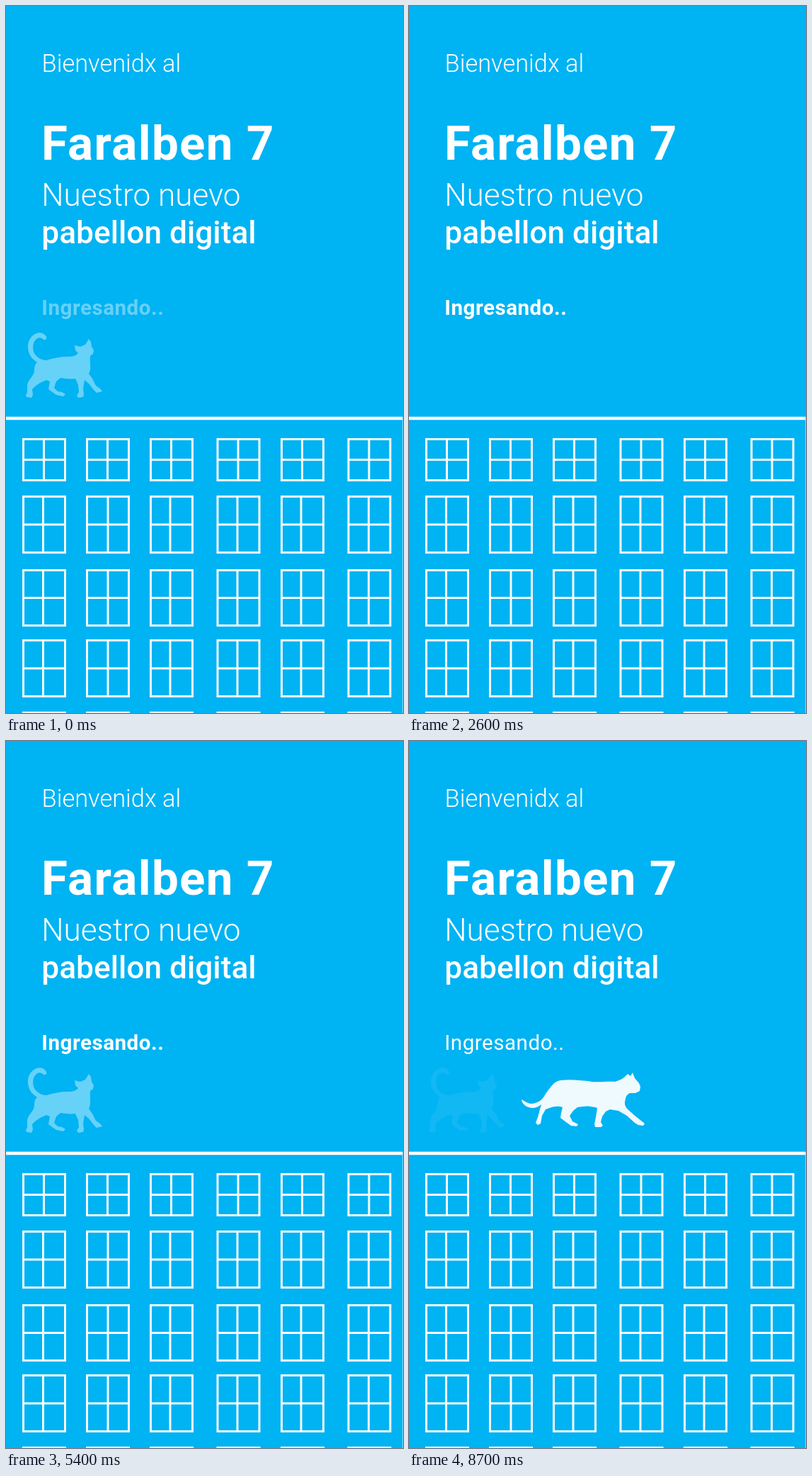
Recreate the animation shown at these times as an HTML page. Size 561x998 px, loop 8.8 s.

```html
<!DOCTYPE html>
<html lang="es">
<head>
<meta charset="utf-8">
<title>Ingresando</title>
<style>
html, body { margin: 0; width: 100%; height: 100%; overflow: hidden; background: #00b3f3; }
svg { display: block; width: 100%; height: 100%; }
text { font-family: Roboto, sans-serif; fill: #fff; }
.light { font-weight: 300; }
.status { font-size: 29.6px; letter-spacing: .5px; }
</style>
</head>
<body>
<svg viewBox="0 0 561 998">
  <defs>
    <path id="house" d="M57 467 C54 461 47 460 41 463 C32 468 29 479 32 488 C34 496 40 500 44 503
      C38 508 42 514 38 521 C35 526 30 530 30 537 L30 546 L28 549 L29 552 L36 553 L38 549 L37 541
      L41 537 L48 532 L57 528 L62 530 L60 541 L64 544 L71 549 L81 551 L84 548 L79 545 L73 544
      L68 539 L71 530 L77 525 C85 526 92 527 98 526 L102 535 L103 545 L100 550 L102 553 L109 552
      L110 548 L109 540 L111 528 L117 533 L124 542 L128 546 L136 544 L133 540 L127 536 L122 526
      L117 519 C121 512 118 503 119 494 L123 491 L124 486 L121 481 L120 474 L117 470 L112 478
      L105 481 L97 479 L98 486 L102 490 C99 494 94 495 87 495 C77 495 67 497 57 500
      C49 500 45 496 41 492 C37 486 37 476 42 471 C46 467 50 468 53 471 C56 472 58 470 57 467 Z"/>
    <path id="prowler" d="M159 506 C164 509 168 512 174 512 C186 510 189 505 193 498 C199 491 203 481 214 479
      C229 477 241 479 253 480 C265 483 279 480 291 481 C298 479 303 476 306 473 L309 470 L313 473
      L316 468 L319 476 L325 483 L327 488 L326 494 L320 497 L312 497 C306 500 306 505 305 510
      C304 518 312 522 318 528 L328 536 L333 540 L331 543 L324 542 L319 539 L308 529 L296 522
      L284 520 L278 523 L273 530 L271 538 L274 543 L271 545 L263 545 L262 541 L264 531 L266 518
      C255 514 247 516 238 517 L232 522 L227 529 L231 537 L239 541 L237 544 L229 543 L222 538
      L214 532 L215 525 L217 517 C209 514 201 517 193 520 L188 529 L186 540 L182 542 L179 539
      L182 531 L185 520 L187 513 C181 518 175 519 169 517 C163 515 159 510 159 506 Z"/>
  </defs>
  <rect width="561" height="998" fill="#00b3f3"/>
  <text class="light" x="50.6" y="93.3" font-size="34.4">Bienvenidx al</text>
  <text x="50" y="217" font-size="67.3" font-weight="700" letter-spacing="1.3">Faralben 7</text>
  <text class="light" x="50.2" y="282.2" font-size="44.1">Nuestro nuevo</text>
  <text x="50.3" y="335.2" font-size="44.2" font-weight="500">pabellon digital</text>
  <text id="bold" class="status" x="50.3" y="436" font-weight="700">Ingresando..</text>
  <text id="thin" class="status" x="50.3" y="436">Ingresando..</text>
  <g id="cats" fill="#fff"></g>
  <path d="M0 582H560" stroke="#fff" stroke-width="4.6"/>
  <path d="M560.5 580V998" stroke="#fff" stroke-opacity=".5"/>
  <path id="windows" fill="none" stroke="#f6fcff" stroke-width="3"/>
</svg>
<script>
const LOOP = 8800, CYCLE = 2700, FADE = 150, STEP = 100;
const $ = id => document.getElementById(id);
const clamp = v => Math.max(0, Math.min(1, v));

// Facade: [left, mullion] of each column, [top, height] of each row.
// The attic row on top has centred mullions.
const columns = [[23, 52.5], [113, 144], [203, 232], [297.5, 327], [388, 417], [482.5, 512.5]];
const rows = [[610, 61], [691, 82], [795, 81], [894, 82], [996, 82]];
$('windows').setAttribute('d', rows.map(([y, h], row) => columns.map(([x, mid]) =>
  `M${x + 1.5} ${y + 1.5}h59v${h - 3}h-59zM${row ? mid : x + 30.5} ${y}v${h}M${x} ${y + h / 2}h62`
).join('')).join(''));

// Each cat fades in around one time and out around the next
const times = [15, 535, 1080, 1615, 2160];
const cats = [['house', 0], ['prowler', 0], ['house', 324], ['prowler', 302]].map(([shape, x]) => {
  const cat = document.createElementNS('http://www.w3.org/2000/svg', 'use');
  cat.setAttribute('href', '#' + shape);
  cat.setAttribute('x', x);
  $('cats').append(cat);
  return cat;
});

// The caption changes weight shortly before each cat
const TEXT_LEAD = 100;

const ramp = (t, mid) => clamp(.5 + (t - mid) / FADE);

function draw(t) {
  const p = t % CYCLE;
  cats.forEach((cat, i) => {
    cat.setAttribute('opacity', ramp(p, times[i]) - ramp(p, times[i + 1]));
  });
  const beat = times.filter(s => p >= s - TEXT_LEAD).length;
  const isThin = beat % 2 === 0;
  $('bold').setAttribute('opacity', isThin ? 0 : ramp(t, times[0]));
  $('thin').setAttribute('opacity', isThin ? 1 : 0);
}

const start = performance.now();
function tick() {
  const t = (performance.now() - start) % LOOP;
  draw(Math.floor(t / STEP) * STEP);
  requestAnimationFrame(tick);
}
tick();
</script>
</body>
</html>
```
